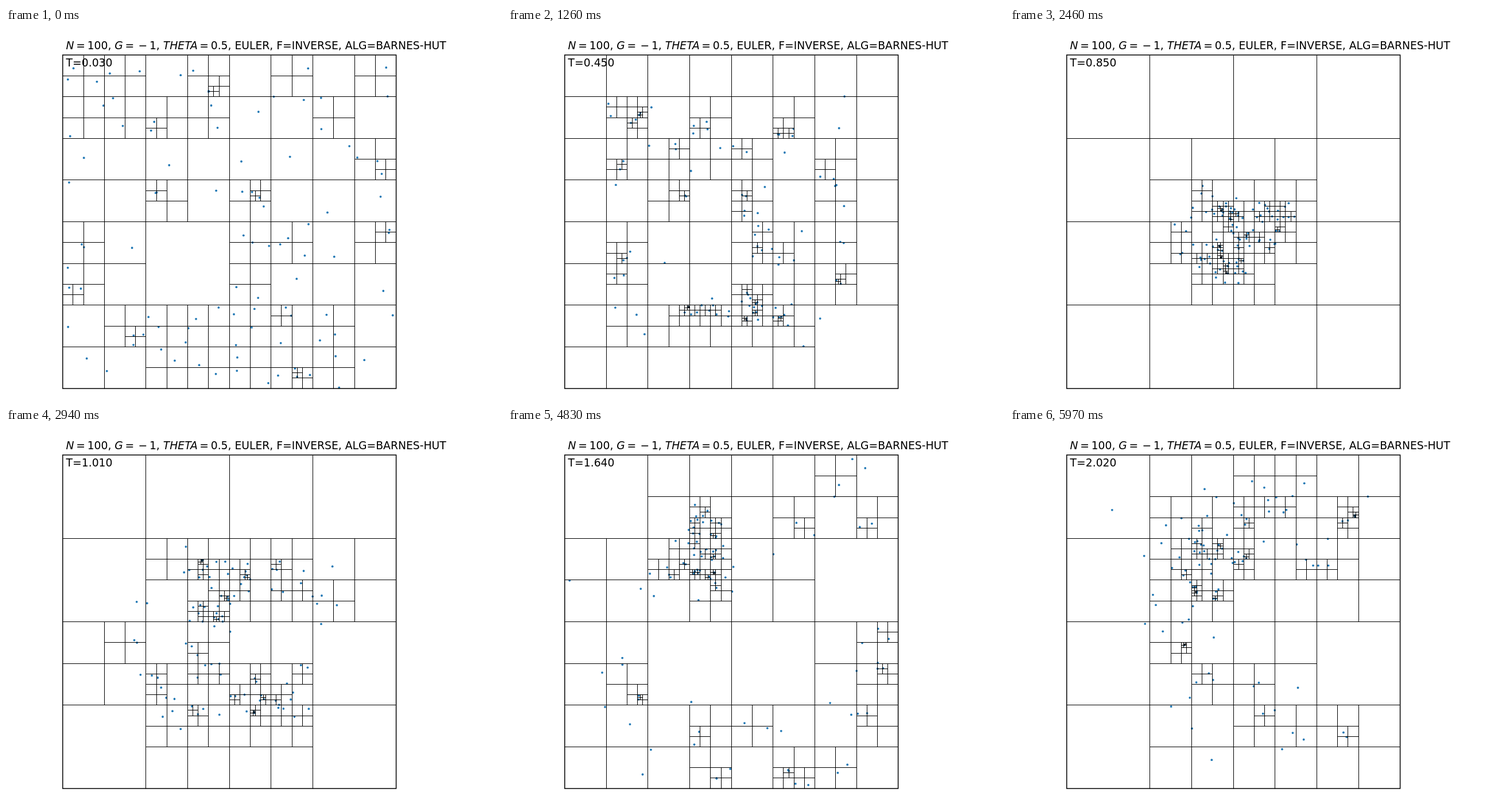
Recreate the animation shown at these times as an HTML page with a canvas. Size 864 by 648 pixels, loop 6000 ms.

```html
<!DOCTYPE html>
<html lang="en">
<head>
<meta charset="utf-8">
<title>Barnes-Hut bodies</title>
<style>
  html, body { margin: 0; width: 100%; height: 100%; overflow: hidden; background: #fff; }
  canvas { display: block; }
</style>
</head>
<body>
<canvas id="stage" width="864" height="648"></canvas>
<script>
const N = 100, THETA = 0.5, DT = 0.01, FRAMES = 200, FRAME_MS = 30, FIRST_STEP = 3;
const LEFT = 98.7, BOTTOM = 628.1, SIZE = 581;
const FONT = '18.75px "DejaVu Sans", sans-serif';
const ctx = document.getElementById('stage').getContext('2d');

// Mersenne Twister giving 53-bit floats in [0, 1)
function twister(seed) {
  const mt = new Uint32Array(624);
  mt[0] = seed;
  for (let k = 1; k < 624; k++) {
    mt[k] = Math.imul(1812433253, mt[k - 1] ^ (mt[k - 1] >>> 30)) + k;
  }
  let pos = 624;
  function next() {
    if (pos === 624) {
      for (let k = 0; k < 624; k++) {
        const y = (mt[k] & 0x80000000) | (mt[(k + 1) % 624] & 0x7fffffff);
        mt[k] = mt[(k + 397) % 624] ^ (y >>> 1) ^ (y & 1 ? 0x9908b0df : 0);
      }
      pos = 0;
    }
    let y = mt[pos++];
    y ^= y >>> 11;
    y ^= (y << 7) & 0x9d2c5680;
    y ^= (y << 15) & 0xefc60000;
    return (y ^ (y >>> 18)) >>> 0;
  }
  return () => ((next() >>> 5) * 67108864 + (next() >>> 6)) / 2 ** 53;
}

// Quadtree node: lower-left corner, width, centre of mass, children
function buildTree(bodies, x, y, size, depth = 0) {
  const node = { x, y, size, mass: bodies.length / N, cx: 0, cy: 0, kids: null };
  for (const b of bodies) {
    node.cx += b.x / bodies.length;
    node.cy += b.y / bodies.length;
  }
  if (bodies.length < 2 || depth > 24) {
    node.body = bodies[0];
    return node;
  }
  const half = size / 2, parts = [[], [], [], []];
  for (const b of bodies) parts[(b.x >= x + half) + 2 * (b.y >= y + half)].push(b);
  node.kids = parts.map((p, q) =>
    buildTree(p, x + (q & 1) * half, y + (q >> 1) * half, half, depth + 1));
  return node;
}

function pull(b, node) {
  if (!node.mass || node.body === b) return;
  const dx = node.cx - b.x, dy = node.cy - b.y, d2 = dx * dx + dy * dy;
  if (node.kids && node.size >= THETA * Math.sqrt(d2)) {
    for (const kid of node.kids) pull(b, kid);
  } else if (d2 > 0) {
    b.ax += node.mass * dx / d2;
    b.ay += node.mass * dy / d2;
  }
}

// Walls reflect along one axis
function bounce(b, pos, vel) {
  if (b[pos] >= 0 && b[pos] <= 1) return;
  b[pos] = b[pos] < 0 ? -b[pos] : 2 - b[pos];
  b[vel] = -b[vel];
}

// Semi-implicit Euler: velocity first, then position
function step(bodies) {
  const tree = buildTree(bodies, 0, 0, 1);
  for (const b of bodies) {
    b.ax = b.ay = 0;
    pull(b, tree);
  }
  for (const b of bodies) {
    b.vx += b.ax * DT;
    b.vy += b.ay * DT;
    b.x += b.vx * DT;
    b.y += b.vy * DT;
    bounce(b, 'x', 'vx');
    bounce(b, 'y', 'vy');
  }
}

function simulate() {
  const rand = twister(0), speed = () => 0.2 * rand() - 0.1;
  const bodies = Array.from({ length: N }, () =>
    ({ vx: speed(), vy: speed(), x: rand(), y: rand() }));
  const frames = [];
  for (let n = 1; n < FIRST_STEP + FRAMES; n++) {
    step(bodies);
    if (n >= FIRST_STEP) frames.push(bodies.map(b => ({ x: b.x, y: b.y })));
  }
  return frames;
}

const px = x => LEFT + SIZE * x;
const py = y => BOTTOM - SIZE * y;
const snap = v => Math.floor(v) + 0.5;

function traceTree(node) {
  if (!node.kids) return;
  const { x, y, size } = node;
  const mx = snap(px(x + size / 2)), my = snap(py(y + size / 2));
  ctx.moveTo(mx, snap(py(y)));
  ctx.lineTo(mx, snap(py(y + size)));
  ctx.moveTo(snap(px(x)), my);
  ctx.lineTo(snap(px(x + size)), my);
  node.kids.forEach(traceTree);
}

function drawTitle() {
  const gap = 3.65;
  let x = 104.6;
  const run = (text, style = '') => {
    ctx.font = style + FONT;
    ctx.fillText(text, x, 37);
    x += ctx.measureText(text).width;
  };
  const sign = s => { x += gap; run(s); x += gap; };
  run('N', 'italic ');
  sign('=');
  run('100, ');
  run('G', 'italic ');
  sign('=');
  sign('\u2212');
  run('1, ');
  run('THETA', 'italic ');
  sign('=');
  run('0.5, EULER, F=INVERSE, ALG=BARNES-HUT');
}

function draw(n) {
  ctx.fillStyle = '#fff';
  ctx.fillRect(0, 0, 864, 648);

  ctx.fillStyle = '#1f77b4';
  for (const b of frames[n]) {
    ctx.beginPath();
    ctx.arc(px(b.x), py(b.y), 1.9, 0, 2 * Math.PI);
    ctx.fill();
  }

  ctx.strokeStyle = ctx.fillStyle = '#000';
  ctx.lineWidth = 1;
  ctx.beginPath();
  traceTree(buildTree(frames[n], 0, 0, 1));
  ctx.stroke();
  ctx.lineWidth = 1.5;
  ctx.strokeRect(98.8, 47, 580.8, 581);

  drawTitle();
  ctx.font = FONT;
  ctx.fillText('T=' + ((n + FIRST_STEP) * DT).toFixed(3), 104.6, 67);
}

const frames = simulate();
const start = performance.now();
function tick() {
  draw(Math.floor(Math.max(0, performance.now() - start) / FRAME_MS) % FRAMES);
  requestAnimationFrame(tick);
}
tick();
</script>
</body>
</html>
```
